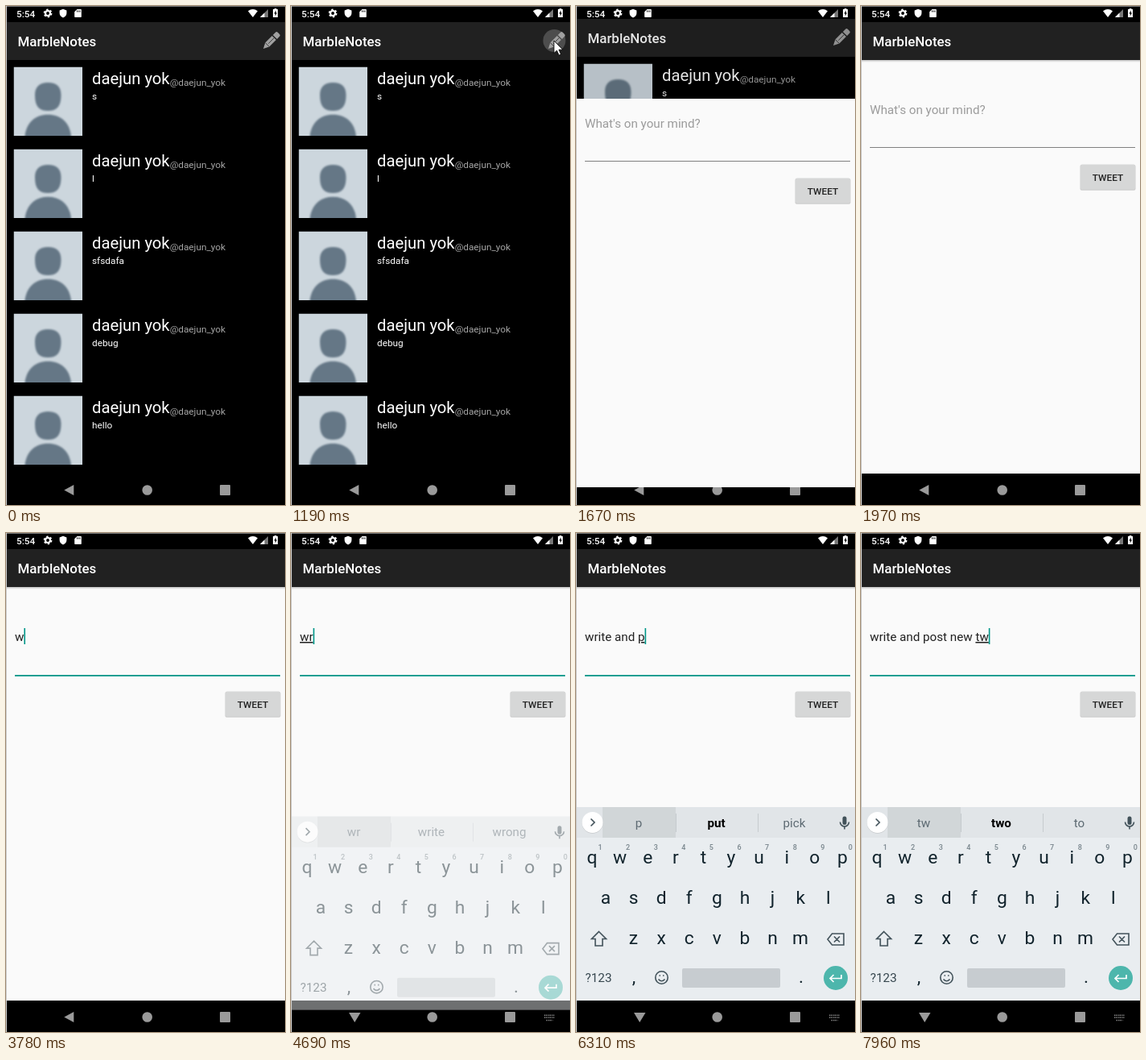
An HTML page that plays this animation: 347 by 619 pixels, repeating every 8 s.

```html
<!DOCTYPE html>
<html lang="en">
<head>
<meta charset="utf-8">
<title>Compose</title>
<style>
html, body { margin: 0; width: 100%; height: 100%; overflow: hidden; background: #000; }
svg { display: block; width: 100%; height: 100%; font-family: Roboto, sans-serif; }
text { white-space: pre; }
.title { font-size: 16.9px; font-weight: 500; fill: #fff; }
.small { font-size: 11.82px; }
.input { font-size: 15.2px; }
.letters { font-size: 22.8px; fill: #11232c; text-anchor: middle; }
.hints { font-size: 9px; font-weight: 500; fill: #78858c; text-anchor: middle; }
.words { font-size: 15.2px; fill: #5d6a72; text-anchor: middle; }
#word { text-decoration: underline; text-decoration-thickness: 1px; text-decoration-skip-ink: none; }
</style>
</head>
<body>
<svg viewBox="0 0 347 619">
  <defs>
    <clipPath id="oldClip"><rect id="oldRect" width="347" height="619"/></clipPath>
    <clipPath id="newClip"><rect id="newRect" width="347" height="619"/></clipPath>
    <clipPath id="barClip"><rect x="1" y="20" width="346" height="47"/></clipPath>
    <clipPath id="photoClip"><rect width="85.5" height="85.5"/></clipPath>
    <filter id="soft"><feGaussianBlur stdDeviation=".8"/></filter>
    <linearGradient id="shade" x2="0" y2="1">
      <stop stop-opacity=".22"/><stop offset="1" stop-opacity="0"/>
    </linearGradient>
    <g id="avatar" clip-path="url(#photoClip)">
      <rect width="86" height="86" fill="#ccd6dd"/>
      <path fill="#657786" filter="url(#soft)" d="M42.700 19.500C54 19.500 59 25 59 35C59 49 54 54.500 42.700 54.500S26.500 49 26.500 35C26.500 25 32 19.500 42.700 19.500ZM14 90V86C16 69 27 59.300 42.700 59.300S70 69 71.500 86V90Z"/>
    </g>
    <g id="bar">
      <rect x="1" y="20" width="346" height="47" fill="#212121"/>
      <text class="title" x="14.5" y="50">MarbleNotes</text>
    </g>
  </defs>
  <rect width="347" height="619"/>

  <g id="status" fill="#fff">
    <text class="small" x="13" y="13.6" font-weight="500">5:54</text>
    <g fill="none" stroke="#fff">
      <circle cx="52" cy="9" r="3" stroke-width="2.2"/>
      <circle cx="52" cy="9" r="4.6" stroke-width="1.6" stroke-dasharray="2.4 2.42"/>
    </g>
    <path d="M71 3.8l4.4 1.8v3.2c0 2.8-1.8 4.8-4.4 5.6c-2.6-.8-4.4-2.8-4.4-5.6V5.6z"/>
    <path d="M88.5 4H93q.8 0 .8.8v8.4q0 .8-.8.8H86q-.8 0-.8-.8V7.2z"/>
    <path stroke="#000" stroke-width=".9" d="M88.4 5.5v2M90.2 5.5v2M92 5.5v2"/>
    <path d="M301 6.3Q307 1.7 313 6.3L307 14z"/>
    <path d="M326 4v10h-10z" fill="#777"/><path d="M321.5 8.5V14H316z"/>
    <path d="M333.8 4v-1h2.6v1h1.6v10h-6V4z"/>
    <path d="M335.8 5.5l-2.4 4h1.4v3l2.2-4h-1.2z" fill="#000"/>
  </g>

  <g id="nav" fill="#9a9a9a">
    <path id="back"/>
    <circle cx="175.7" cy="600.5" r="6.3"/>
    <rect x="266" y="594" width="13" height="13" rx="1"/>
    <path id="imeIcon" stroke="#8a8a8a" stroke-width="1.5" stroke-dasharray="1.5 1" d="M315 598.3h13M315 601h13M317.5 604.5h8"/>
  </g>

  <g id="oldView" clip-path="url(#oldClip)"><g id="oldBody">
    <rect x="1" y="20" width="346" height="560"/>
    <use href="#bar"/>
    <g clip-path="url(#barClip)"><circle id="ripple" fill="#fff"/></g>
    <g transform="translate(320 53) rotate(-45)">
      <path fill="#a0a0a0" d="M0 0L7-3.6H19V3.6H7ZM20.5-3.6H25q2 0 2 2V1.6q0 2-2 2H20.5z"/>
      <path stroke="#3c3c3c" stroke-width=".9" fill="none" d="M7-3.6V3.6M9 0H19"/>
    </g>
    <g id="rows"></g>
    <rect id="dim" x="1" y="20" width="346" height="560"/>
  </g></g>

  <g id="newView" clip-path="url(#newClip)"><g id="newBody">
    <rect x="1" y="20" width="346" height="560" fill="#fafafa"/>
    <rect x="1" y="67" width="346" height="3" fill="url(#shade)"/>
    <use href="#bar"/>
    <text id="hint" class="input" x="11" y="134" fill="#9b9b9b">What's on your mind?</text>
    <text id="typed" class="input" x="11" y="134" fill="#212121"><tspan id="done"></tspan><tspan id="word"></tspan></text>
    <rect id="caret" y="118" width="1.6" height="20" fill="#009688"/>
    <rect id="line" x="11" width="330"/>
    <rect x="272.5" y="197" width="69" height="31.8" rx="2" fill-opacity=".18"/>
    <rect x="273" y="196.5" width="68" height="31" rx="2" fill="#d6d7d7"/>
    <text class="small" x="307" y="216.6" font-weight="500" fill="#212121" text-anchor="middle">TWEET</text>
  </g></g>

  <g id="keyboard">
    <rect x="1" y="340" width="346" height="240" fill="#e9edf0"/>
    <rect x="1" y="340" width="346" height="38" fill="#e1e5e8"/>
    <rect x="33" y="340" width="91" height="38" fill="#d1d6d8"/>
    <path stroke="#c6cbce" d="M124.5 348v23M226.5 348v23"/>
    <circle cx="20.5" cy="359.8" r="13" fill-opacity=".12"/>
    <circle cx="20.5" cy="359" r="13" fill="#fff"/>
    <g class="words"><text x="78" y="364.5"></text><text x="174.5" y="364.5"></text><text x="271.5" y="364.5"></text></g>
    <g id="keys"></g>
    <g fill="none" stroke="#42525a" stroke-width="1.6">
      <path d="M18.5 354.5l4.5 4.5l-4.5 4.5"/>
      <path d="M28.5 494.5l9 9h-4.5v8.5h-9v-8.5h-4.5z"/>
      <path d="M318.5 497h14.5v14h-14.5l-5.5-7zM321 500.5l7 7M328 500.5l-7 7"/>
      <circle cx="106.5" cy="551.5" r="7.7"/>
      <path d="M102.5 553.5q4 4.5 8 0M103.5 549h1.5M108 549h1.5"/>
      <path d="M328.5 358.5a5.5 5.5 0 0 0 11 0M334 364v3.5"/>
    </g>
    <rect x="331.5" y="351.5" width="5" height="10.5" rx="2.5" fill="#42525a"/>
    <rect x="132" y="540" width="122" height="24" rx="2" fill="#c7ccd0"/>
    <text x="11.5" y="557" font-size="15.3" fill="#37474f">?123</text>
    <circle cx="323" cy="552" r="15" fill="#4db6ac"/>
    <path d="M330 548v4.5h-13.5M320.5 548l-4.5 4.5l4.5 4.5" fill="none" stroke="#fff" stroke-width="1.7"/>
  </g>

  <path id="mouse" d="M0 0V15.5L3.6 12.2L6.2 18.2L8.8 17L6.2 11.2H11z" fill="#fff" stroke="#000" stroke-width=".9"/>
  <path d="M0 .5H347" stroke="#777"/>
  <path d="M.5 0V619" stroke="#ccc"/>
</svg>
<script>
const LOOP = 8000, STEP = 60;
const PHRASE = 'write and post new tw';
const KEY_TIMES = [3780, 4390, 4870, 5110, 5230, 5290, 5840, 5960, 6080, 6190, 6310,
  6420, 6590, 6710, 6770, 7320, 7390, 7470, 7530, 7780, 7960];
// One line per typed length; * marks the auto-correction
const GUESSES = ['', 'w with we', 'wr write wrong', 'wri write wrist', 'writ write writing',
  'write writer written', 'a the about', 'a and I', 'an and any', 'and an any', 'the a then',
  'p *put pick', 'po *post poor', 'pos *post posts', 'post posts poster', 'it a the',
  'n new not', 'ne *new need', 'new news newer', 'one year and', 't to the', 'tw *two to'];
const EASE = [0, 0, .4, 0, .2, 1, 1, 1];
const REVEAL_A = [0, 0, .05, 0, .1333, .06, .1667, .4];
const REVEAL_B = [.1667, .4, .2083, .82, .25, 1, 1, 1];

const $ = id => document.getElementById(id);
const set = (id, attrs) => { for (const k in attrs) $(id).setAttribute(k, attrs[k]); };
const show = (id, on) => set(id, { visibility: on ? 'visible' : 'hidden' });
const hold = (t, start) => start + STEP * Math.floor((t - start) / STEP);
const clamp = v => Math.max(0, Math.min(1, v));

// Height of a cubic Bezier curve at x
function curve(x, p) {
  const at = (u, i) => (1 - u) ** 3 * p[i] + 3 * u * (1 - u) ** 2 * p[i + 2]
    + 3 * u * u * (1 - u) * p[i + 4] + u ** 3 * p[i + 6];
  let lo = 0, hi = 1;
  for (let i = 0; i < 24; i++) {
    const mid = (lo + hi) / 2;
    if (at(mid, 0) < x) lo = mid; else hi = mid;
  }
  return at(hi, 1);
}

$('rows').innerHTML = ['s', 'l', 'sfsdafa', 'debug', 'hello'].map((msg, i) => `
  <g transform="translate(0 ${i * 102})">
    <use href="#avatar" x="9.5" y="75.5"/>
    <text x="107" y="97.3" font-size="20.26" fill="#fff">daejun yok<tspan class="small" dy="2" fill="#a5a5a5">@daejun_yok</tspan></text>
    <text class="small" x="107" y="116" fill="#fff">${msg}</text>
  </g>`).join('');

const keyRow = (chars, x, y, cls = 'letters') => [...chars].map((c, i) =>
  `<text class="${cls}" x="${x + i * 34.6}" y="${y}">${c}</text>`).join('');
$('keys').innerHTML = keyRow('qwertyuiop', 20, 410) + keyRow('1234567890', 30, 393, 'hints')
  + keyRow('asdfghjkl', 37, 460) + keyRow('zxcvbnm', 71.5, 510)
  + keyRow(',', 72, 558) + keyRow('.', 280, 558);
const words = document.querySelectorAll('.words text');

function drawMouse(t) {
  const p = 1 - (1 - clamp((hold(t, 280) - 280) / 360)) ** 2;
  const out = clamp((hold(t, 1190) - 1190) / 120) ** 1.6;
  set('mouse', { transform: `translate(${345 - 18 * p - 54 * out} ${21 + 22 * p + 5 * out})` });
  show('mouse', t >= 280 && t < 1370);
  const r = (hold(t, 1190) - 1190) / STEP;
  show('ripple', r >= 0 && r < 3);
  set('ripple', { cx: 327.5 + r, cy: 43, r: Math.max(0, 14 + 8 * r), opacity: .2 - .05 * r });
}

// Windows move by whole pixels
function drawSwitch(t) {
  const x = clamp((hold(t, 1610) - 1545) / 425);
  const open = t >= 1610, move = open ? curve(x, EASE) : 0;
  const shown = curve(x, x < .1667 ? REVEAL_A : REVEAL_B);
  const drop = 25.4 * (1 - move);
  const top = open ? Math.ceil(594 * (1 - shown) + drop) : 619;
  set('oldRect', { height: top });
  set('oldBody', { transform: `translate(0 ${Math.ceil(-12.4 * move)})` });
  set('dim', { opacity: open ? .1 : 0 });
  set('newRect', { y: top });
  set('newBody', { transform: `translate(0 ${Math.ceil(drop)})` });
  show('oldView', x < 1);
  show('newView', open);
}

function drawTyping(t) {
  const n = KEY_TIMES.filter(k => k <= t).length;
  const text = PHRASE.slice(0, n), cut = t < 4600 ? n : text.lastIndexOf(' ') + 1;
  $('done').textContent = text.slice(0, cut);
  $('word').textContent = text.slice(cut);
  set('hint', { opacity: n ? 0 : 1 });
  set('line', n ? { y: 176, height: 1.8, fill: '#009688' } : { y: 175, height: 1, fill: '#808080' });
  const lit = n && (t - KEY_TIMES[n - 1]) % 1000 < 490;
  set('caret', { x: 11 + (n ? $('typed').getComputedTextLength() : 0), opacity: lit ? 1 : 0 });
  const guesses = GUESSES[n].split(' ');
  words.forEach((w, i) => {
    const guess = guesses[i] || '', bold = guess[0] === '*';
    w.textContent = bold ? guess.slice(1) : guess;
    w.setAttribute('style', bold ? 'font-weight:700;fill:#000' : '');
  });
}

function drawKeyboard(t) {
  const ime = t >= 4510, p = clamp((hold(t, 4690) - 4655) / 260);
  set('back', { d: ime ? 'M72 595H86.5L79.2 607z' : 'M72.3 600.5L84.3 594V607z' });
  show('imeIcon', ime);
  show('keyboard', t >= 4690);
  set('keyboard', { transform: `translate(0 ${24 * (1 - p) ** 5})`, opacity: clamp(.2 + 2 * p) });
}

function frame(now) {
  const t = now % LOOP;
  drawMouse(t);
  drawSwitch(t);
  drawTyping(t);
  drawKeyboard(t);
  requestAnimationFrame(frame);
}
frame(0);
</script>
</body>
</html>
```
